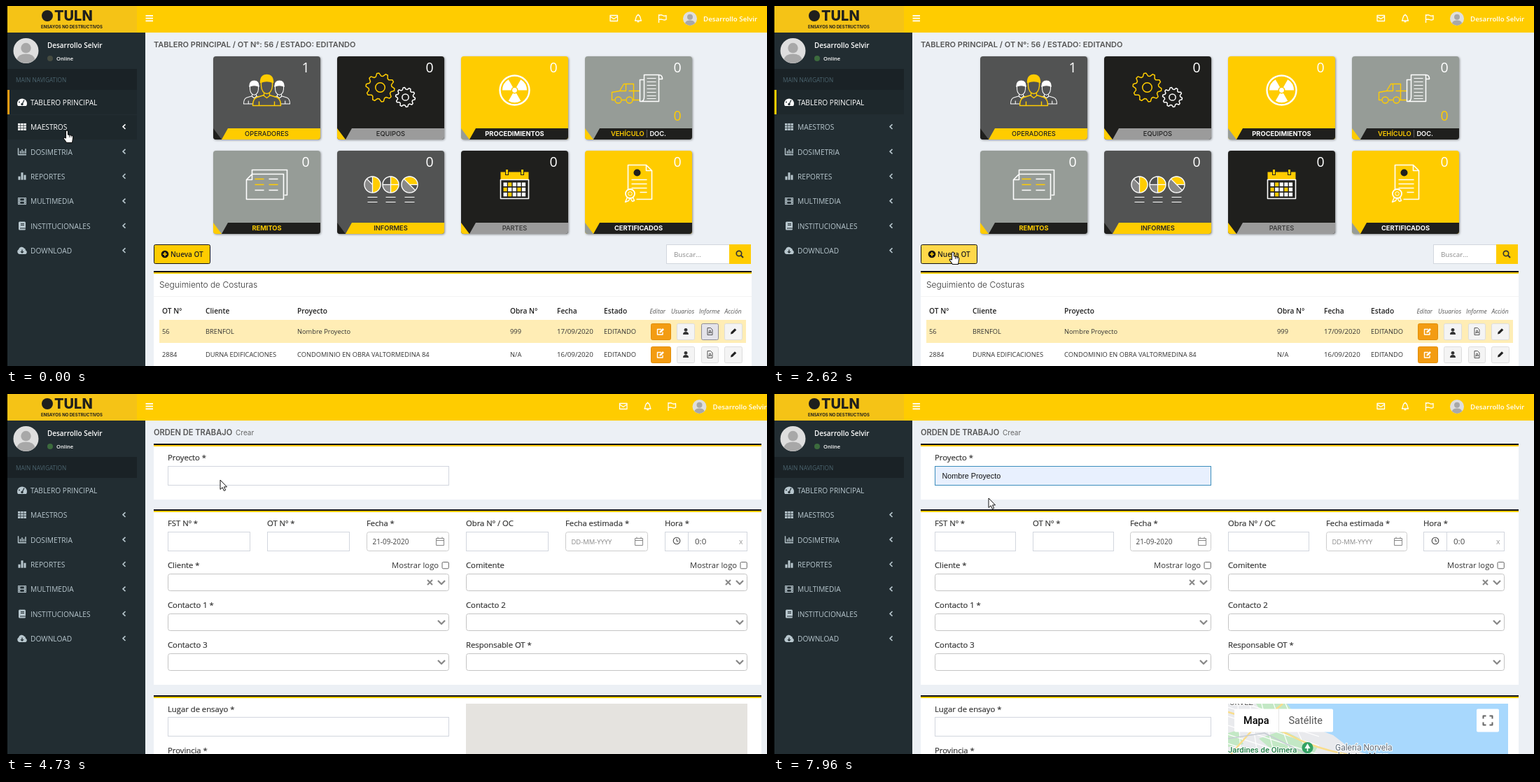
An HTML page that plays this animation: 1087x515 px, repeating every 8000 ms.

```html
<!DOCTYPE html>
<html lang="es">
<head>
<meta charset="utf-8">
<title>Tablero</title>
<style>
html, body { margin: 0; width: 100%; height: 100%; overflow: hidden; background: #ecf0f5; }
svg { display: block; width: 1087px; height: 515px; }
svg svg { width: auto; height: auto; }
text { font-family: "Open Sans", "Noto Sans", sans-serif; white-space: pre; }
.m { font-family: Inter, sans-serif; }
.r { font-family: Roboto, sans-serif; }
.a { font-family: "Liberation Sans", Arial, sans-serif; }
.b { font-weight: 600; }
.l { font-weight: 300; }
.i { font-style: italic; }
.mid { text-anchor: middle; }
.halo { paint-order: stroke; stroke: #fff; stroke-width: 2px; }
.card { filter: drop-shadow(1px 1px 1.5px rgba(0,0,0,.4)); }
.pop { filter: drop-shadow(0 1px 2px rgba(0,0,0,.35)); }
</style>
</head>
<body>
<svg id="stage" viewBox="0 0 1087 515"></svg>
<script>
const YEL = '#ffcc00', INK = '#1f1f1d', DARK = '#525353', GRAY = '#969c97', MUTE = '#b8c7ce';
const USER = 'Desarrollo Selvir';

// Drawing helpers
const rect = (x, y, w, h, fill, more = '') => `<rect x="${x}" y="${y}" width="${w}" height="${h}" fill="${fill}" ${more}/>`;
const circle = (x, y, r, fill, more = '') => `<circle cx="${x}" cy="${y}" r="${r}" fill="${fill}" ${more}/>`;
const text = (x, y, s, size, fill = '#333', cls = '', more = '') =>
  `<text x="${x}" y="${y}" font-size="${size}" fill="${fill}" class="${cls}" ${more}>${s}</text>`;
const fillPath = (d, fill) => `<path d="${d}" fill="${fill}"/>`;
const line = (d, color, w = 1.5, fill = 'none') =>
  `<path d="${d}" fill="${fill}" stroke="${color}" stroke-width="${w}" stroke-linejoin="round"/>`;
const at = (x, y, s) => `<g transform="translate(${x} ${y})">${s}</g>`;
const many = (n, f) => Array.from({ length: n }, (_, i) => f(i)).join('');
const polar = (r, a) => `${(r * Math.cos(a)).toFixed(2)} ${(r * Math.sin(a)).toFixed(2)}`;
const sector = (r, from, to) => {
  const a = from * Math.PI / 180, b = to * Math.PI / 180;
  return `M0 0L${polar(r, a)}A${r} ${r} 0 ${to - from > 180 ? 1 : 0} 1 ${polar(r, b)}Z`;
};
const gear = (r, n, color) => {
  const pts = Array.from({ length: n * 4 }, (_, i) => polar(i % 4 < 2 ? r : r * .8, (i + .5) / (n * 4) * 2 * Math.PI));
  return line(`M${pts.join('L')}Z`, color, 1.5) + circle(0, 0, r * .33, 'none', `stroke="${color}" stroke-width="1.5"`);
};

// Card icons, centred on the card
const person = color =>
  line('M-9 -11Q-9 -22 0 -22T9 -11Q0 -15 -9 -11ZM-8 -11V-6Q-7 4 0 5Q7 4 8 -6V-11M-4 4V8L0 11L4 8V4M-4 7L-14 10Q-20 12 -20 22H20Q20 12 14 10L4 7M-11 22V16M11 22V16', color, 1.4) +
  fillPath('M-9 -11Q-9 -22 0 -22T9 -11Q0 -15 -9 -11Z', color);
const avatar = (x, y, r) => at(x, y, circle(0, 0, r, '#dedede') + circle(0, -r * .22, r * .4, '#a8a8a8') +
  fillPath(`M${-r * .72} ${r * .68}Q${-r * .6} ${r * .25} 0 ${r * .25}T${r * .72} ${r * .68}Q0 ${r * 1.3} ${-r * .72} ${r * .68}Z`, '#a8a8a8'));
const pie = (x, cuts, full, dim) => at(x, 0,
  fillPath(sector(11.5, ...full), YEL) + fillPath(sector(11.5, ...dim), '#888') +
  circle(0, 0, 11.5, 'none', 'stroke="#fff" stroke-width="1.4"') + cuts.map(a => line(`M0 0L${polar(11.5, a * Math.PI / 180)}`, '#fff', 1.3)).join('') +
  line('M-7 18H7M-7 25H7', '#fff', 1.2));
const icons = [
  () => `<g transform="translate(-18 3) scale(.75)">${person('#fff')}</g><g transform="translate(18 3) scale(.75)">${person('#fff')}</g>` +
    fillPath('M-11 -10H11L9 2L5 8L18 12L20 22H-20L-18 12L-5 8L-9 2Z', DARK) + person(YEL),
  () => at(-15, -4, gear(20.5, 10, YEL)) + at(21, 10, gear(14, 10, '#fff')),
  () => circle(0, 0, 21, 'none', 'stroke="#fff" stroke-width="2.4"') +
    [60, 180, 300].map(a => fillPath(sector(17.5, a, a + 60), '#fff')).join('') + circle(0, 0, 5, YEL) + circle(0, 0, 3.4, '#fff'),
  () => line('M-34 14H-38V3L-27 1L-21 -9H-7V14H-9M-24 14H-18M-18 -9V1H-27M-14 1H2M-7 14H2', YEL, 1.4) +
    circle(-29, 14, 4.5, 'none', `stroke="${YEL}" stroke-width="1.4"`) + circle(-13, 14, 4.5, 'none', `stroke="${YEL}" stroke-width="1.4"`) +
    line('M8 -22H29Q34 -22 34 -16H29V16H2V-15H8V-22ZM8 -15V10Q8 16 3 16M29 -16V-22', '#fff', 1.5, GRAY) +
    line('M12 -17H25M12 -12H25M12 -7H25M12 -2H25M12 3H25M12 8H25M12 12H25', '#fff', 1.2),
  () => line('M-21 -15V-21H29V15H25', '#fff', 1.6) + line('M-21 -15H24V21H-29V-7ZM-29 -7H-21V-15', '#fff', 1.6) +
    line('M-17 -8H-4M-17 0H-4M3 0H16', YEL, 1.5) + line('M3 -8H16M-17 8H-4M3 8H16', '#fff', 1.5),
  () => pie(-26, [90, 225, 270], [-90, 90], [90, 225]) + pie(0, [0, 90, 180, 270], [-90, 90], [90, 180]) +
    pie(27, [0, 45, 225], [225, 360], [45, 225]),
  () => rect(-20, -18, 40, 11, YEL) + line('M-20 -7V20H20V-7Z', '#fff', 1.6) +
    many(2, i => rect(-13 + i * 22, -22, 4, 8, YEL, `stroke="${INK}"`)) +
    many(15, i => rect(-16 + i % 5 * 6.6, -3 + Math.floor(i / 5) * 7.2, 5.2, 5.5, [1, 5, 8, 11].includes(i) ? YEL : '#fff')),
  () => line('M-15 12V-28H11L19 -20V21H-3M11 -28V-20H19', '#fff', 1.6) + circle(-2, -17, 5, INK) +
    line('M-10 -7H12M-10 -1H12M-10 5H12M2 11H12', '#fff', 1.4) +
    circle(-12, 13, 6.5, YEL, 'stroke="#fff" stroke-width="1.8"') + circle(-12, 13, 2.8, 'none', 'stroke="#fff"') +
    line('M-16 18L-19 25L-14 23L-12 19L-9 24L-6 23L-8 18', '#fff', 1.4)
];
const cards = [
  ['OPERADORES', DARK, INK, YEL, '#222', 500], ['EQUIPOS', INK, YEL, '#9b9b9b', '#222', 500],
  ['PROCEDIMIENTOS', YEL, GRAY, INK, '#fff', 700],
  [`VEHÍCULO <tspan fill="#777" font-weight="400">|</tspan> <tspan fill="#fff">DOC.</tspan>`, GRAY, YEL, INK, YEL, 600],
  ['REMITOS', GRAY, YEL, INK, YEL, 700], ['INFORMES', DARK, INK, YEL, '#222', 600],
  ['PARTES', INK, YEL, '#9b9b9b', '#333', 500], ['CERTIFICADOS', YEL, GRAY, INK, '#fff', 700]
];
function card(i, s) {
  const [label, base, corner, band, ink, weight] = cards[i];
  const w = s.wide ? 156 : 153, pitch = s.wide ? 180 : 177, h = 119;
  const x = (s.wide ? 297 : 296) + i % 4 * pitch, y = i < 4 ? 72 : 207, mid = w / 2;
  return at(x, y, `<g class="card">${rect(0, 0, w, h, base, 'rx="4"')}</g>` +
    fillPath(`M0 103L12 ${h}H4Q0 ${h} 0 ${h - 4}Z`, corner) +
    fillPath(`M21 103H${w}V${h - 4}Q${w} ${h} ${w - 4} ${h}H12Z`, band) +
    text(mid, 114, label, 9.3, ink, 'm mid', `font-weight="${weight}"`) +
    text(mid + 55.5, 23, i || !s.ready ? 0 : 1, 19.5, '#fff', 'mid') +
    (i === 3 ? text(mid + 55.5, 91.5, 0, 19.5, YEL, 'mid') : '') +
    (i < s.icons ? at(mid, 48.5, icons[i]()) : ''));
}

// Side menu
const menuIcons = [
  c => fillPath('M-6 5.5A7 7 0 1 1 6 5.5Z', c) + line('M0 3L3 -3', '#222d32', 1.3) + circle(0, 3, 1.7, '#222d32') + circle(-4, 0, .9, '#222d32'),
  c => many(9, i => rect(-6 + i % 3 * 4.2, -5 + Math.floor(i / 3) * 3.6, 3.5, 2.8, c)),
  c => line('M-5.5 -5V4.5H6', c, 1.4) + line('M-2.5 3V-1M0 3V-3M2.5 3V-1M5 3V-4', c, 1.5),
  c => rect(-5.5, 0, 3, 5, c) + rect(-1.5, -5.5, 3, 10.5, c) + rect(2.5, -2, 3, 7, c),
  c => rect(-6, -5, 12, 10, c) + rect(-2.8, -3.8, 5.6, 3.2, '#222d32') + rect(-2.8, .7, 5.6, 3.2, '#222d32') +
    many(6, i => rect(i % 2 ? 3.9 : -5.1, -3.8 + Math.floor(i / 2) * 3, 1.2, 1.5, '#222d32')),
  c => rect(-5, -6, 10, 12, c, 'rx="1.5"') + line('M-2 -3H3M-2 -1H3M-3 3.5H5', '#222d32', 1),
  c => fillPath('M-4 5A3.6 3.6 0 0 1 -5 -1.6A4.5 4.5 0 0 1 3 -3.4A3 3 0 0 1 5 -.5A3 3 0 0 1 5 5Z', c) + line('M0 -1.5V3M-2 1.2L0 3.2L2 1.2', '#222d32', 1.3)
];
const menu = ['TABLERO PRINCIPAL', 'MAESTROS', 'DOSIMETRIA', 'REPORTES', 'MULTIMEDIA', 'INSTITUCIONALES', 'DOWNLOAD'];
function sidebar(s) {
  const dash = s.page === 'dash';
  return rect(0, 0, 2, 515, '#000') + rect(2, 38, 197, 477, '#222d32') + rect(2, 0, 185, 38, '#f5c316') +
    circle(59, 14, 8, INK) + text(69, 21, 'TULN', 20, INK, 'm', 'font-weight="800"') +
    text(50, 32, 'ENSAYOS NO DESTRUCTIVOS', 6, INK, 'm', 'font-weight="700"') +
    avatar(28.5, 64, 18) + text(59, 59.5, USER, 9.95, '#fff', 'b') + text(72, 78, 'Online', 7.6, '#fff', 'b') +
    (s.menuReady ? circle(63, 75, 4, s.fresh ? '#3c6b3d' : '#454b40') : '') +
    rect(2, 90, 185, 30, '#1a2226') + text(14, 108.5, 'MAIN NAVIGATION', 8.3, '#4b646f') +
    (dash ? rect(2, 120, 185, 35, '#1e282c') + rect(2, 120, 3, 35, s.fresh ? YEL : '#f39c12') : '') +
    menu.map((name, i) => {
      const y = 138 + i * 35.4, on = i === 0 && dash || i === s.hover, c = on ? '#fff' : MUTE;
      return (i && on ? rect(2, 156, 185, 35, '#1e282c') : '') + text(35, y + 3.7, name, 10.2, c) +
        (s.menuReady || i > 1 && i < 5 ? at(23, y - .5, menuIcons[i](c)) : '') +
        (i && s.menuReady ? line(`M170.5 ${y - 4}L167 ${y - .7}L170.5 ${y + 2.6}`, c, 1.6) : '');
    }).join('');
}
function header(s) {
  const icons = 'M863 13.5H873.5V21.5H863ZM863 15L868.2 18.5L873.5 15M898.5 21C900 19 899.5 13 903 13S906 19 907.5 21Z' +
    'M901.5 22.7H904.5M903 11.5V13M932.5 12V24M932.5 13.5Q935.5 12 938 13.5T943 13.5V19.5Q940.5 20.5 938 19.5T932.5 19.5';
  return rect(0, 0, 1087, 38, YEL) + (s.menuReady ? many(3, i => rect(199.5, 13 + i * 3.7, 10.5, 1.8, '#fff')) : '') +
    at(s.wide ? 13.5 : 0, 0, line(icons, '#fff', 1.3) + avatar(977, 18, 10) + text(996, 21.6, USER, 9.75, '#fff', 'b'));
}
const panel = (y, h, w) => rect(211, y, w, h, '#fff') + rect(211, y, w, 2, '#111') + rect(211, y + 2, w, 2, YEL);

// Dashboard
const pencil = 'M-4 4L-3.3 1L2 -4.3L4.3 -2L-1 3.3Z';
function rowButtons(y, focus) {
  const box = (x, w, fill, edge) => rect(x + .5, y - 11, w, 23, fill, `rx="2" stroke="${edge}"`);
  return box(921, 28, '#f39c12', '#e08e0b') + at(935, y, line('M1 -3H-4.5V4.5H3V1', '#fff', 1.4) + at(1.5, -1, `<path transform="scale(.8)" d="${pencil}" fill="#fff"/>`)) +
    box(958, 25, '#f4f4f4', '#ddd') + at(971, y, circle(0, -2.2, 2.4, '#333') + fillPath('M-4 4.5Q-4 .5 0 .5T4 4.5Z', '#333')) +
    box(993, 24, focus ? '#e4e4ea' : '#f4f4f4', focus ? '#8c8c98' : '#ddd') + at(1005.5, y, line('M-3.5 -5H1L3.5 -2.5V5H-3.5ZM-1.7 3L0 -2L2 2L-1.7 1.5', '#444', .9)) +
    box(1026, 25, '#f4f4f4', '#ddd') + at(1039, y, fillPath(pencil, '#222'));
}
function tableView(s, w) {
  const title = text(219, 403, 'Seguimiento de Costuras', 12, '#333', 'm l');
  const head = (xs, y) => ['OT N°', 'Cliente', 'Proyecto', 'Obra N°', 'Fecha', 'Estado'].map((n, i) => text(xs[i], y, n, 10.2, '#222', 'b')).join('');
  const acts = ['Editar', 'Usuarios', 'Informe', 'Acción'];
  if (!s.ready) return `<g opacity=".3">${title}` +
    head([223, 295, 437, 792, 863, 933], 488.5) + acts.map((n, i) => text(i ? 1007 : 1003, 440 + i * 16.1, n, 8.5, '#333', 'i')).join('') + '</g>';
  const cols = [223, 285, 416, 720, 787, 854];
  const row = (y, cells) => cells.map((c, i) => text(cols[i], y + 3.5, c, i === 4 ? 9.75 : 9.3, '#333')).join('');
  return title + rect(211, 415, w, 1, '#f4f4f4') + head(cols, 440) +
    acts.map((n, i) => text([919.5, 950, 990, 1026.5][i], 440, n, 8.5, '#555', 'i')).join('') +
    rect(219, 449, 838, 33, '#ffedb5') + row(465.5, ['56', 'BRENFOL', 'Nombre Proyecto', '999', '17/09/2020', 'EDITANDO']) + rowButtons(465.5, s.focus) +
    row(498.5, ['2884', 'DURNA EDIFICACIONES', 'CONDOMINIO EN OBRA VALTORMEDINA 84', 'N/A', '16/09/2020', 'EDITANDO']) + rowButtons(498.5);
}
function dashboard(s) {
  const w = s.wide ? 868 : 854, right = 210 + w, bw = s.ready ? 31 : 29, iw = s.ready ? 90 : 95;
  return text(211, 59, 'TABLERO PRINCIPAL' + (s.ready ? ' / OT N°: 56 / ESTADO: EDITANDO' : ''), 11, '#555', 'm b') +
    many(8, i => card(i, s)) +
    rect(211.5, 341.5, s.ready ? 80 : 77, 27, s.btn, 'rx="2" stroke="#111"') +
    (s.ready ? circle(227, 355, 5.3, '#111') + line('M224 355H230M227 352V358', YEL, 1.6) : '') +
    text(s.ready ? 235 : 232.5, 359, 'Nueva OT', 10, '#222', s.ready ? 'b' : '') +
    rect(right - bw - iw + .5, 341.5, iw, 27, '#fff', 'stroke="#d2d6de"') + text(right - bw - iw + 11, 358.8, 'Buscar...', 9.8, '#888') +
    rect(right - bw, 341, bw, 28, YEL) +
    (s.ready ? circle(right - 17, 354, 3.7, 'none', 'stroke="#333" stroke-width="1.7"') + line(`M${right - 14.2} 356.8L${right - 11} 360`, '#333', 2) : '') +
    panel(379, 136, w) + tableView(s, w);
}

// Work order form
function mapView(x, w) {
  return `<svg x="${x}" y="443" style="width:${w}px;height:72px" overflow="hidden">` + rect(0, 0, w, 72, '#e9eaed') +
    fillPath('M82 0H400V72H196L172 62L150 45L126 36L100 18Z', '#a8d8fd') +
    fillPath('M40 0H84L98 18L82 25L50 16ZM44 50L78 38L128 62L122 72H70ZM0 42L14 38L22 58L0 62Z', '#c3e8c5') +
    many(7, i => line(`M${i * 17 - 20} 0L${i * 24 - 30} 72`, '#fff', 1.2) + line(`M0 ${i * 13 - 8}L130 ${i * 13 + 34}`, '#fff', 1.2)) +
    line('M0 12Q55 28 92 47T178 74M4 72L38 34L78 0', '#f9dd8b', 2.4) + line('M0 50L52 42L112 72', '#c6cbd3', 1.5) +
    text(2, 1.5, 'ORVEZ', 11, '#555', 'r halo') +
    text(0, 70, 'Jardines de Olmera', 11.3, '#228048', 'r halo', 'font-weight="500"') +
    circle(113.5, 63, 8, '#34a264') + fillPath('M113.5 57L117.5 64H109.5ZM112.7 64H114.3V68H112.7Z', '#fff') +
    text(153, 67, 'Galería Norvela', 12, '#5f6b78', 'r halo') + text(153, 79, 'de Artes Mayo', 12, '#5f6b78', 'r halo') +
    rect(9, 7.5, 141, 33, '#fff', 'rx="2"') + rect(72, 7.5, 1, 33, '#e6e6e6') +
    text(22, 29, 'Mapa', 14.5, '#000', 'r', 'font-weight="500"') + text(86.5, 29, 'Satélite', 14.5, '#565656', 'r') +
    rect(w - 40, 7.5, 32, 33, '#fff', 'rx="2"') +
    at(w - 24, 24, line('M-6.5 -2.5V-6.5H-2.5M2.5 -6.5H6.5V-2.5M6.5 2.5V6.5H2.5M-2.5 6.5H-6.5V2.5', '#666', 2)) + '</svg>';
}
const projects = ['Nombre Proyecto', 'Proyecto de inspección general', 'Ensayo de soldaduras en planta norte', 'Obra nueva', 'Control de costuras', 'Tanque de prueba', 'Línea de gas'];
function popup(s) {
  if (!s.list) return '';
  const full = s.list > 1;
  return `<g class="pop">${rect(231, 131, full ? 244 : 155, full ? 187 : 42, '#fff')}</g>` +
    (s.pick ? rect(231, 140, 155, 24.5, '#e8e8e8') : '') +
    projects.slice(0, s.list).map((p, i) => text(241, 156 + i * 24.2, p, 10.1, '#222')).join('');
}
function form(s) {
  const w = s.wide ? 868 : 854, pitch = (w - 16) / 6, col = i => Math.round(231 + i * pitch);
  const wide = Math.round(pitch * 3 - 24), half = Math.round(pitch - 24);
  const label = (i, y, t) => text(col(i), y, t, 11.27, '#333', '', 'stroke="#333" stroke-width=".2"');
  const input = (x, y, w, edge = '#d2d6de', fill = '#fff', r = 0) => rect(x + .5, y + .5, w - 1, 27, fill, `stroke="${edge}" rx="${r}"`);
  const select = (i, y, clear) => {
    const end = col(i) + wide;
    return rect(col(i) + .5, y + .5, wide - 1, 24, '#fff', 'rx="3" stroke="#c4c4c4"') +
      line(`M${end - 16} ${y + 10}L${end - 11} ${y + 15}L${end - 6} ${y + 10}`, '#888', 2.3) +
      (clear ? line(`M${end - 31} ${y + 9}L${end - 24} ${y + 16}M${end - 24} ${y + 9}L${end - 31} ${y + 16}`, '#888', 2) : '');
  };
  const date = (i, t, color, size) => {
    const x = col(i) + half - 19;
    return input(col(i), 197, half, '#ccc', '#fff', 3) + text(col(i) + 8.5, 214.5, t, size, color) +
      line(`M${x + .5} 206.5H${x + 11.5}V216.5H${x + .5}ZM${x} 209.5H${x + 12}M${x + 3} 204.5V207M${x + 9} 204.5V207`, '#888', 1);
  };
  const check = i => {
    const end = col(i) + wide;
    return text(end - 82, 249, 'Mostrar logo', 11.27, '#333') + rect(end - 10, 240.5, 9.3, 9.3, '#fff', 'rx="1.5" stroke="#666"');
  };
  const hx = col(5);
  return text(211, 59, 'ORDEN DE TRABAJO', 11.1, '#555', 'm b') + text(328, 59, 'Crear', 10, '#666', 'm') +
    panel(71, 80, w) + panel(165, 251, w) + panel(431, 84, w) +
    label(0, 95, 'Proyecto *') + input(231, 103, wide, s.active ? '#3c8dbc' : '#d2d6de', s.pick ? '#e8f0fe' : '#fff') +
    (s.pick ? text(241.5, 121, 'Nombre Proyecto', 10.75, '#111', 'a') : text(241.5, 120.5, s.typed, 10.4, '#666')) +
    (s.caret ? rect(s.typed ? 249 : 241.5, 110, 1, 13, '#222') : '') +
    ['FST Nº *', 'OT Nº *', 'Fecha *', 'Obra Nº / OC', 'Fecha estimada *', 'Hora *'].map((t, i) => label(i, 189, t)).join('') +
    [0, 1, 3].map(i => input(col(i), 197, half)).join('') +
    date(2, '21-09-2020', '#444', 9.95) + date(4, 'DD-MM-YYYY', '#888', 9.4) +
    input(hx, 197, 34) + input(hx + 33, 197, half - 33) + circle(hx + 17, 210, 4.8, 'none', 'stroke="#444" stroke-width="1.1"') +
    line(`M${hx + 17} 207V210.5H${hx + 19.5}`, '#444', 1) + text(hx + 43, 215, '0:0', 11.5, '#444') + text(hx + half - 12, 215, 'x', 10.5, '#999') +
    label(0, 249, 'Cliente *') + check(0) + label(3, 249, 'Comitente') + check(3) + select(0, 257, 1) + select(3, 257, 1) +
    label(0, 306, 'Contacto 1 *') + label(3, 306, 'Contacto 2') + select(0, 314) + select(3, 314) +
    label(0, 363, 'Contacto 3') + label(3, 363, 'Responsable OT *') + select(0, 371) + select(3, 371) +
    label(0, 455, 'Lugar de ensayo *') + input(231, 462, wide) + label(0, 514, 'Provincia *') +
    (s.map === 1 ? rect(col(3), 443, wide, 72, '#e5e3df') : s.map ? mapView(col(3), wide) : '') + popup(s);
}

// Pointers, with the hot spot at 0,0
const pointers = {
  arrow: line('M0 0V13.5L3.2 10.7L5.4 15.5L7.6 14.5L5.5 9.9H9.5Z', '#111', 1, '#fff'),
  hand: line('M-1.5 1Q0 -1 1.5 1V6L7.5 7.5Q9 8 8.7 10.5L7.5 17.5H-.5L-4.8 11.5Q-5 9 -1.5 11Z', '#111', 1.1, '#fff') + line('M3.5 7V10M6 7.5V10', '#111', .8),
  beam: line('M-2.8 -6.5H-.6L0 -6L.6 -6.5H2.8M0 -6V6M-2.8 6.5H-.6L0 6L.6 6.5H2.8', '#222', 1.2)
};

// Each step changes part of the state: [ms, pointer, x, y, changes]
const HOVER = '#ffd84a';
const steps = [
  [0, 'hand', 87, 178, { page: 'dash', wide: 0, ready: 1, menuReady: 1, fresh: 0, icons: 8, hover: 1, focus: 1, btn: YEL }],
  [120, 'hand', 90, 172, { focus: 0 }],
  [240, 'hand', 93, 161],
  [370, 'hand', 96, 146, { hover: 0 }],
  [500, 'hand', 99, 130],
  [620, 'hand', 100, 132],
  [740, 'hand', 101, 137],
  [1120, 'arrow', 185, 200, { hover: -1 }],
  [1240, 'arrow', 245, 257],
  [1390, 'arrow', 251, 310],
  [1490, 'arrow', 256, 349],
  [1630, 'arrow', 255, 353],
  [1750, 'arrow', 254, 355],
  [1870, 'arrow', 254, 356],
  [2120, 'hand', 256, 352, { wide: 1, ready: 0, menuReady: 0, fresh: 1, icons: 0, btn: HOVER }],
  [2370, 'hand', 257, 352, { icons: 3 }],
  [2490, 'hand', 257, 352, { icons: 8, menuReady: 1 }],
  [2620, 'hand', 257, 352, { wide: 0, ready: 1 }],
  [2980, 'hand', 257, 352, { btn: '#ffc800' }],
  [3110, 'hand', 257, 352, { btn: HOVER }],
  [3610, 'hand', 260, 351],
  [3730, 'hand', 261, 350],
  [3980, 'arrow', 261, 350, { page: 'form', wide: 1, map: 0, typed: '', active: 0, caret: 0, list: 0, pick: 0 }],
  [4360, 'arrow', 266, 318, { map: 1 }],
  [4490, 'arrow', 284, 230],
  [4610, 'arrow', 302, 148],
  [4730, 'arrow', 306, 123],
  [4860, 'beam', 307, 117],
  [4980, 'beam', 307, 116, { active: 1 }],
  [5110, 'beam', 307, 116, { caret: 1 }],
  [5360, 'beam', 307, 116, { wide: 0 }],
  [5610, 'beam', 307, 116, { map: 2, caret: 0 }],
  [5860, 'beam', 307, 116, { list: 7 }],
  [5980, 'beam', 307, 116, { caret: 1 }],
  [6230, 'beam', 307, 116, { typed: 'N', list: 1 }],
  [6720, 'beam', 307, 116, { caret: 0 }],
  [7210, 'beam', 307, 116, { caret: 1 }],
  [7590, 'arrow', 308, 141, { caret: 0 }],
  [7710, 'arrow', 308, 149, { pick: 1 }],
  [7960, 'arrow', 308, 149, { list: 0 }]
];
const stage = document.getElementById('stage'), LOOP = 8000;
let shown = -1;
function frame() {
  const t = performance.now() % LOOP, now = steps.findLastIndex(step => step[0] <= t);
  if (now !== shown) {
    shown = now;
    const s = Object.assign({}, ...steps.slice(0, now + 1).map(step => step[4]));
    const [, kind, x, y] = steps[now];
    stage.innerHTML = header(s) + sidebar(s) + (s.page === 'dash' ? dashboard(s) : form(s)) + at(x, y, pointers[kind]);
  }
  requestAnimationFrame(frame);
}
frame();
</script>
</body>
</html>
```
